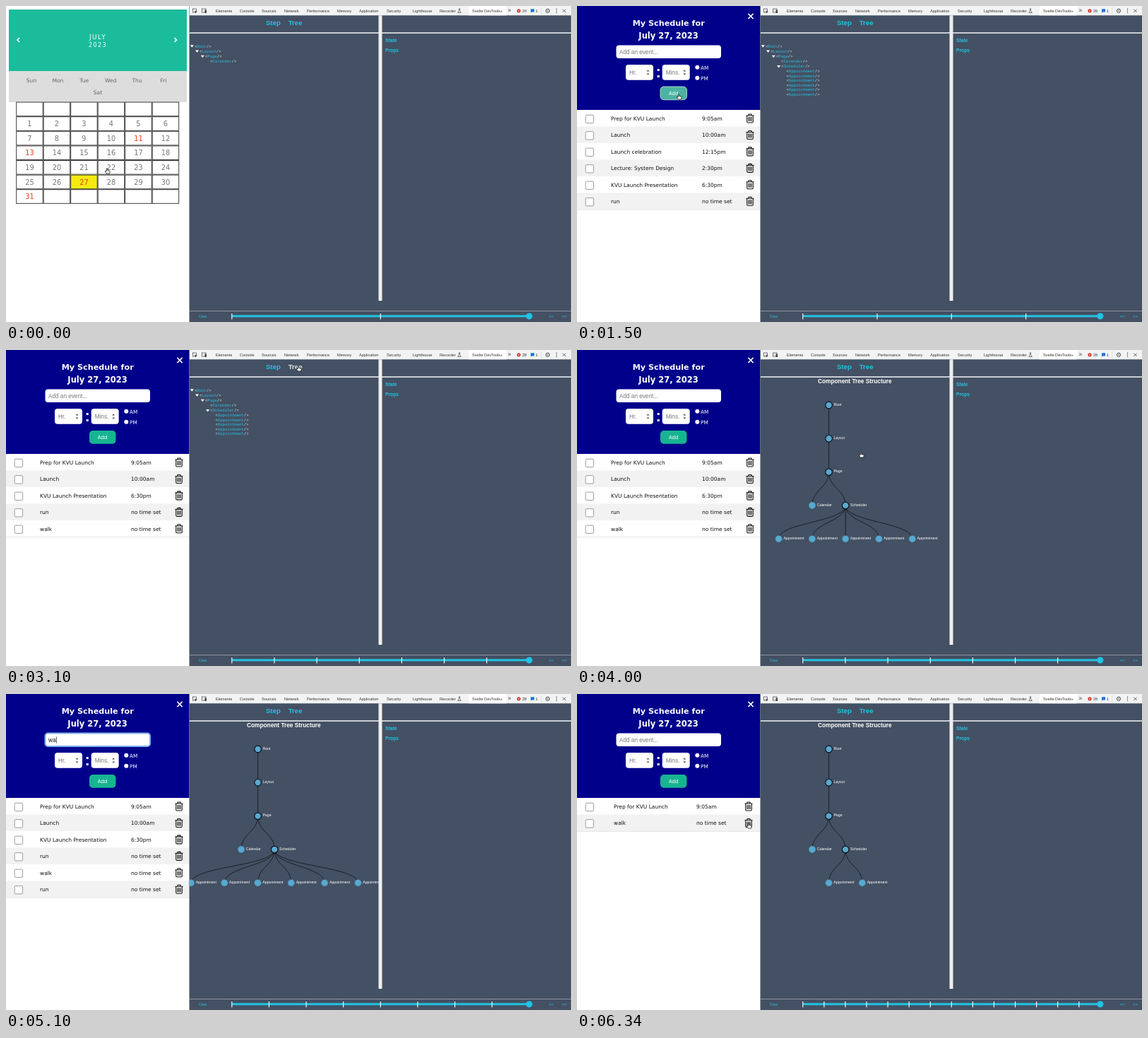
These frames come from a looping animation (800x447 px, 6490 ms). An HTML page with a canvas:

```html
<!DOCTYPE html>
<html lang="en">
<head>
<meta charset="utf-8">
<title>Schedule and component tree</title>
<style>
  html, body { margin: 0; width: 100%; height: 100%; overflow: hidden; background: #fff; }
  canvas { display: block; width: 800px; height: 447px; }
</style>
</head>
<body>
<canvas id="stage" width="800" height="447"></canvas>
<script>
const g = document.getElementById('stage').getContext('2d');
const LOOP = 6490, LAST = 6340;
const SANS = '"Liberation Sans", Arial, sans-serif';
const WIDE = '"DejaVu Sans", Verdana, sans-serif';
const MONO = '"Liberation Mono", monospace';
const CYAN = '#20c4e4', SLATE = '#445063', PALE = '#f1f3f4';

const START_LIST = [
  ['Prep for KVU Launch', '9:05am'], ['Launch', '10:00am'], ['Launch celebration', '12:15pm'],
  ['Lecture: System Design', '2:30pm'], ['KVU Launch Presentation', '6:30pm']
];
const OPEN_SCHEDULE = 200, EXPAND = 600, SHOW_TREE = 3300;
// A string adds an entry, a number removes the entry at that index.
const EDITS = [
  [1500, 'run'], [2100, 'walk'], [2400, 2], [2800, 2], [4900, 'run'], [5500, 'walk'],
  [5800, 1], [5900, 1], [6100, 1], [6200, 1], [LAST, 1]
];
const TYPING = [[900, 'run', 1500], [1700, 'walk', 2100], [4400, 'run', 4900], [5000, 'walk', 5500]];
const BADGES = [[0, 24], [700, 25], [1400, 26], [2000, 27], [2100, 28]];
// time, x, y, pointer shape (empty: hidden)
const POINTER = [
  [0, 143, 230, 'hand'], [100, 111, 247, 'hand'], [300, 254, 108, 'arrow'], [500, 286, 85, 'hand'],
  [600, 286, 85, 'hand'], [700, 130, 65, 'arrow'], [900, 130, 65, ''], [1300, 138, 110, 'arrow'],
  [1400, 144, 125, 'hand'], [1500, 144, 125, 'hand'], [1600, 130, 66, 'arrow'], [1700, 130, 66, ''],
  [2100, 144, 125, 'hand'], [2300, 244, 205, 'hand'], [2800, 244, 205, 'hand'], [3000, 355, 85, 'arrow'],
  [3100, 414, 23, 'hand'], [3300, 414, 23, 'hand'], [3500, 402, 145, 'hand'], [4000, 402, 145, 'hand'],
  [4200, 140, 123, 'hand'], [4300, 130, 66, 'arrow'], [4400, 130, 66, ''], [4900, 144, 125, 'hand'],
  [5000, 130, 66, ''], [5400, 144, 125, 'hand'], [5600, 243, 183, 'hand'], [LAST, 243, 183, 'hand']
];

function text(s, x, y, size, color, family = SANS, align = 'left', weight = '') {
  g.font = `${weight} ${size}px ${family}`;
  g.textAlign = align;
  g.fillStyle = color;
  g.fillText(s, x, y);
}
function rect(x, y, w, h, color) {
  g.fillStyle = color;
  g.fillRect(x, y, w, h);
}
function round(x, y, w, h, r, fill, stroke, width = 1) {
  g.beginPath();
  g.roundRect(x, y, w, h, r);
  paint(fill, stroke, width);
}
function circle(x, y, r, fill, stroke, width = 1) {
  g.beginPath();
  g.arc(x, y, r, 0, 7);
  paint(fill, stroke, width);
}
function path(d, x, y, fill, stroke, width = 1) {
  g.save();
  g.translate(x, y);
  const p = new Path2D(d);
  if (fill) { g.fillStyle = fill; g.fill(p); }
  if (stroke) { g.strokeStyle = stroke; g.lineWidth = width; g.stroke(p); }
  g.restore();
}
function paint(fill, stroke, width) {
  if (fill) { g.fillStyle = fill; g.fill(); }
  if (stroke) { g.strokeStyle = stroke; g.lineWidth = width; g.stroke(); }
}

function panAt(t) {
  const p = (t - 3500) / 500;
  return p > 0 && p < 1
    ? { x: 20 * Math.sin(Math.PI * p), y: 45 * Math.sin(2 * Math.PI * p) }
    : { x: 0, y: 0 };
}
function pointerAt(t) {
  const i = POINTER.findLastIndex(k => k[0] <= t);
  const a = POINTER[i], b = POINTER[i + 1] || a;
  const p = b === a ? 0 : (t - a[0]) / (b[0] - a[0]);
  const pan = panAt(t);
  return { x: a[1] + (b[1] - a[1]) * p + pan.x, y: a[2] + (b[2] - a[2]) * p + pan.y, shape: a[3] };
}
function stateAt(t) {
  const list = [...START_LIST];
  const done = EDITS.filter(e => e[0] <= t);
  for (const [, edit] of done) {
    if (typeof edit === 'string') list.push([edit, 'no time set']);
    else list.splice(edit, 1);
  }
  const typing = TYPING.find(([from, , to]) => t >= from && t < to);
  return {
    list,
    typed: typing ? typing[1].slice(0, (t - typing[0]) / 100 + 1) : '',
    segments: t < OPEN_SCHEDULE ? 2 : 3 + done.length,
    badge: BADGES.findLast(b => b[0] <= t)[1],
    pointer: pointerAt(t)
  };
}
const over = (p, x, y, w, h) => p.shape && p.x >= x && p.x <= x + w && p.y >= y && p.y <= y + h;

function calendar() {
  rect(4, 5, 252, 87, '#1abc9c');
  rect(4, 92, 252, 44, '#dddddd');
  g.letterSpacing = '1.4px';
  text('JULY', 130, 46.5, 9, '#fff', WIDE, 'center');
  text('2023', 130, 58, 8, '#fff', WIDE, 'center');
  g.letterSpacing = '0px';
  path('M2 -3L-1 0L2 3', 17, 48, null, '#fff', 1.7);
  path('M-2 -3L1 0L-2 3', 240.5, 48, null, '#fff', 1.7);
  ['Sun', 'Mon', 'Tue', 'Wed', 'Thu', 'Fri'].forEach((d, i) =>
    text(d, 36 + i * 37.4, 108, 7.6, '#666', WIDE, 'center'));
  text('Sat', 130, 125, 7.6, '#666', WIDE, 'center');
  const w = 38.5, h = 20.6;
  for (let i = 0; i < 42; i++) {
    const x = 14.2 + i % 6 * w, y = 135.6 + Math.floor(i / 6) * h, day = i - 5;
    g.strokeStyle = '#3c3c3c';
    g.lineWidth = 1;
    if (day === 27) rect(x, y, w, h, '#f4ea12');
    g.strokeRect(x + .5, y + .5, w - 1, h - 1);
    if (day > 0 && day < 32) {
      const marked = [11, 13, 27, 31].includes(day);
      text(day, x + w / 2, y + 14, 9.8, marked ? '#e2401c' : '#777', WIDE, 'center');
    }
  }
}

function trash(x, y) {
  path('M-5.5 -4H5.5M-2 -4V-6H2V-4M-4.3 -4V4.5Q-4.3 6 -3 6H3Q4.3 6 4.3 4.5V-4M-2 -2V4M0 -2V4M2 -2V4',
    x, y, null, '#111', 1.1);
}

function timeBox(x, label) {
  round(x, 83, 39, 21.7, 4, '#fff');
  text(label, x + 5, 97, 8.2, '#777');
  path('M-2 -1.5L0 -3.8L2 -1.5ZM-2 1.5L0 3.8L2 1.5Z', x + 31.5, 94, '#555');
}

function schedule({ list, typed, pointer }) {
  rect(0, 0, 259.5, 147, '#00008b');
  text('My Schedule for', 129.7, 27.8, 11.2, '#fff', WIDE, 'center', 'bold');
  text('July 27, 2023', 129.5, 46.3, 11.5, '#fff', WIDE, 'center', 'bold');
  path('M-3.6 -3.6L3.6 3.6M3.6 -3.6L-3.6 3.6', 246, 14.5, null, '#fff', 1.5);

  round(55.5, 55.5, 148.5, 18.5, 4, '#fff', typed && '#7fb2f0', 2);
  if (typed) {
    text(typed, 60, 67.8, 8.2, '#111');
    rect(60.5 + g.measureText(typed).width, 60.5, .7, 9, '#111');
  } else {
    text('Add an event...', 60, 67.8, 8.2, '#777');
  }
  timeBox(69, 'Hr.');
  timeBox(120.7, 'Mins.');
  rect(113.7, 89, 3, 3, '#fff');
  rect(113.7, 98, 3, 3, '#fff');
  circle(170.3, 86.7, 3, '#fff');
  circle(170.3, 101.7, 3, '#fff');
  text('AM', 175, 89.5, 7.3, '#fff', WIDE);
  text('PM', 175, 104.5, 7.3, '#fff', WIDE);
  const hover = over(pointer, 118, 114, 38, 19);
  round(118, 114, 37.5, 18.7, 5, hover ? '#4bb3a2' : '#17b491', hover && '#d8e8d8', .8);
  text('Add', 136.7, 126, 7.2, '#fff', WIDE, 'center');

  const untimed = list.some(e => e[1] === 'no time set');
  const long = list.some(e => e[0].endsWith('Presentation'));
  const [nameX, timeX, trashX] = !untimed ? [50, 184, 244] : long ? [48, 177, 245] : [52, 169, 243];
  list.forEach(([name, time], i) => {
    const y = 147 + i * 23.45;
    if (i % 2) rect(0, y, 259.5, 23.45, '#f2f2f2');
    round(12.2, y + 7.2, 11.4, 11.4, 1.5, '#fff', '#858585', .8);
    text(name, nameX, y + 14.7, 7.5, '#111', WIDE);
    text(time, timeX, y + 14.7, 7.5, '#111', WIDE);
    trash(trashX, y + 12);
  });
  rect(0, 147 + list.length * 23.45, 259.5, .8, '#e0e0e0');
}

function toolbar(badge) {
  rect(260, 0, 540, 13.3, PALE);
  rect(655, 0, 53, 13.3, '#fff');
  const ink = '#444';
  g.strokeStyle = ink;
  g.lineWidth = .7;
  g.strokeRect(264.5, 4, 5, 5);
  path('M0 0L4 1.5L2 2.2L1.4 4Z', 267, 6.5, ink);
  g.strokeRect(277.5, 4, 5.5, 5);
  rect(281.5, 5.5, 2.5, 4.5, ink);
  const tabs = {
    Elements: 297, Console: 331, Sources: 362, Network: 394, Performance: 426, Memory: 469,
    Application: 500, Security: 539, Lighthouse: 576, Recorder: 614, 'Svelte DevTools+': 660
  };
  for (const name in tabs) text(name, tabs[name], 9, 5.6, '#333');
  path('M-1 -3H1M-.6 -3V-.5L-2.3 2.5H2.3L.6 -.5V-3', 642, 7, null, ink, .7);
  text('»', 710.5, 9, 8.5, ink);
  circle(726, 6.8, 2.6, '#d93025');
  path('M-1 -1L1 1M1 -1L-1 1', 726, 6.8, null, '#fff', .6);
  text(badge, 731, 9, 5.6, '#333');
  path('M-2.5 -2.5H2.5V1.8H-1L-2.5 3Z', 745.5, 6.7, '#1a73e8');
  text('1', 749.7, 9, 5.6, '#333');
  rect(757.5, 2.5, .6, 9, '#ccc');
  circle(767, 6.8, 2.6, null, ink, 1);
  circle(767, 6.8, .8, ink);
  for (const y of [4.3, 6.8, 9.3]) circle(779.5, y, .7, ink);
  path('M-2.2 -2.2L2.2 2.2M2.2 -2.2L-2.2 2.2', 790.5, 6.8, null, ink, .8);
}

function codeTree(count, expanded) {
  const line = (name, x, y, arrow) => {
    if (arrow) path(arrow === 'open' ? 'M-2.5 -1.5H2.5L0 2Z' : 'M-1.3 -2.4L1.8 0L-1.3 2.4Z', x - 3.7, y - 1.8, '#fff');
    text('<', x, y, 5.6, '#dde', MONO);
    text(name, x + 3.36, y, 5.6, CYAN, MONO);
    text('/>', x + 3.36 * (name.length + 1), y, 5.6, '#dde', MONO);
  };
  line('Root', 267, 58.5, 'open');
  line('Layout', 274.3, 65.7, 'open');
  line('Page', 282, 73, 'open');
  line('Calendar', 289.3, 80.2);
  if (!count) return;
  line('Scheduler', 289.3, 87.2, expanded ? 'open' : 'closed');
  if (expanded) for (let i = 0; i < count; i++) line('Appointment', 296.5, 94.2 + i * 6.55);
}

function graph(count, pan) {
  const STEP = 47.3, ROW = y => 78 + y * STEP;
  const node = (name, x, y, parent) => ({ name, x, y: ROW(y), parent });
  const root = node('Root', 356.6, 0), layout = node('Layout', 356.6, 1, root);
  const page = node('Page', 356.6, 2, layout);
  const scheduler = node('Scheduler', 380.2, 3, page);
  const nodes = [root, layout, page, node('Calendar', 333, 3, page), scheduler];
  for (let i = 0; i < count; i++)
    nodes.push(node('Appointment', scheduler.x + (i - (count - 1) / 2) * STEP, 4, scheduler));

  g.save();
  g.beginPath();
  g.rect(260, 39, 267.5, 390);
  g.clip();
  text('Component Tree Structure', 341, 46.5, 8.3, '#fff', SANS, 'left', 'bold');
  g.translate(pan.x, pan.y);
  for (const { x, y, parent: p } of nodes) {
    if (!p) continue;
    const mid = (p.y + y) / 2;
    g.beginPath();
    g.moveTo(p.x, p.y);
    g.bezierCurveTo(p.x, mid, x, mid, x, y);
    paint(null, '#10151c', .8);
  }
  for (const n of nodes) {
    const inner = nodes.some(m => m.parent === n);
    circle(n.x, n.y, 4.8, '#58a9d0', inner ? '#0c1118' : '#3d7796', inner ? 1.2 : .6);
    text(n.name, n.x + 6.8, n.y + .8, 5.2, '#fff');
  }
  g.restore();
}

function devtools(t, { list, badge, segments, pointer }) {
  rect(259.5, 0, 540.5, 447, SLATE);
  toolbar(badge);
  text('Step', 368, 26.8, 9.7, CYAN, SANS, 'left', 'bold');
  text('Tree', 399.7, 26.8, 9.7, over(pointer, 398, 16, 23, 14) ? '#e4e6e8' : CYAN, SANS, 'left', 'bold');
  rect(260, 37.3, 540, 1.6, '#e9ebee');
  if (t >= SHOW_TREE) graph(list.length, panAt(t));
  else codeTree(t < OPEN_SCHEDULE ? 0 : list.length, t >= EXPAND);
  rect(527.5, 13.3, 5, 403.7, '#eeeeee');
  text('State', 537, 51, 6.7, CYAN, SANS, 'left', 'bold');
  text('Props', 537, 65, 6.7, CYAN, SANS, 'left', 'bold');

  rect(260, 431, 540, 1, '#8b93a0');
  text('Clear', 273, 440.8, 4.7, CYAN);
  rect(320, 437.2, 421, 3, CYAN);
  for (let i = 0; i < segments; i++) rect(319.2 + i * 421 / segments, 435, 1.2, 8.3, '#f4f6f8');
  circle(740.8, 438.8, 4.6, CYAN);
  text('<<', 768.5, 441, 6.2, CYAN);
  text('>>', 787, 441, 6.2, CYAN);
}

function drawPointer({ x, y, shape }) {
  if (shape === 'arrow') path('M0 0V7L1.7 5.6L2.8 8L4 7.4L2.9 5.2H5Z', x, y, '#111', '#fff', .6);
  if (shape === 'hand')
    path('M-.8 0Q0 -1 .8 0V2.5L3.6 3.2Q4.4 3.5 4.2 4.8L3.5 7H-.5L-3 4Q-2.5 2.7 -.8 4Z', x, y, '#fff', '#111', .8);
}

function draw() {
  const now = performance.now() % LOOP;
  const t = now >= LAST ? LAST : Math.min(6200, Math.floor(now / 100) * 100);
  const state = stateAt(t);
  rect(0, 0, 800, 447, '#fff');
  if (t < OPEN_SCHEDULE) calendar();
  else schedule(state);
  devtools(t, state);
  drawPointer(state.pointer);
  requestAnimationFrame(draw);
}
draw();
</script>
</body>
</html>
```
